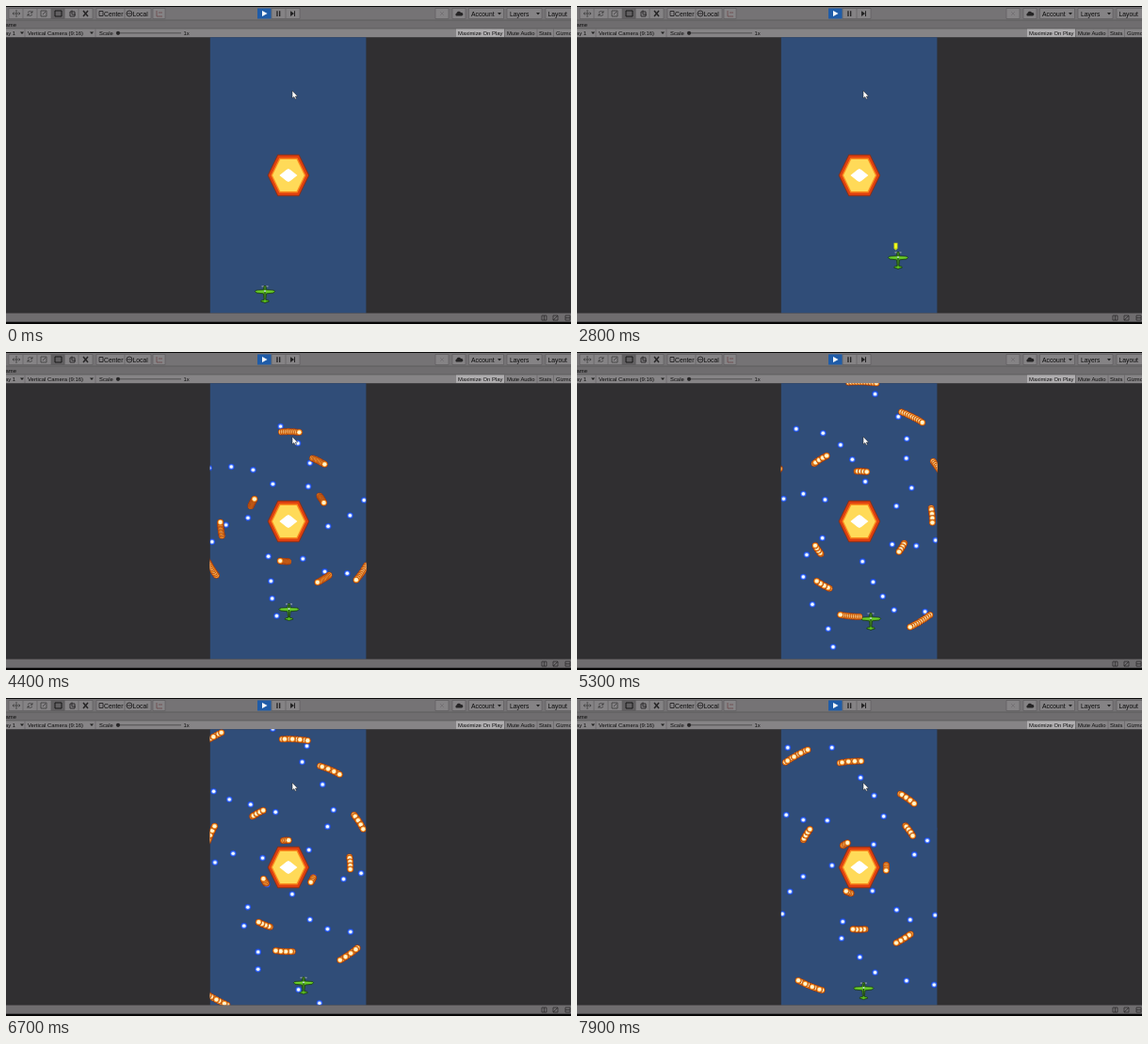
These frames come from a looping animation (600 px wide and 338 px high, 8000 ms). An HTML page:

```html
<!DOCTYPE html>
<html lang="en">
<head>
<meta charset="utf-8">
<title>Bullet patterns</title>
<style>
html, body { margin: 0; width: 100%; height: 100%; overflow: hidden; background: #302f31; }
svg { display: block; width: 100vw; height: 100vh; }
text { font-family: "Liberation Sans", Arial, sans-serif; font-size: 5.9px; fill: #0c0c0c; }
.big { font-size: 6.8px; }
.icon { fill: none; stroke: #262526; stroke-width: .9; }
</style>
</head>
<body>
<svg viewBox="0 0 600 338" preserveAspectRatio="none">
  <defs>
    <clipPath id="view"><rect x="216.8" y="33.2" width="165.6" height="293.300"/></clipPath>
    <g id="blue">
      <circle r="3.3" fill="#1d4be0"/><circle r="2.5" fill="#5c8cff"/><circle r="1.7" fill="#f4f8ff"/>
    </g>
    <g id="orange">
      <circle r="3.5" fill="#97330f"/><circle r="3" fill="#f58d1c"/><circle r="2.1" fill="#fff4d0"/>
    </g>
    <g id="shot">
      <path d="M-2-4H2V2L0 4L-2 2Z" fill="#c3d414"/><path d="M-1.2-3.2H1.2V1.5H-1.2Z" fill="#f7ff1c"/>
    </g>
    <path id="drop" d="M-2-1H2L0 1.4Z" fill="#202020"/>
    <path id="hex" d="M-22.300 0L-11.500-22.300H11.500L22.300 0L11.500 22.300H-11.500Z"/>
  </defs>

  <rect width="600" height="338" fill="#302f31"/>
  <rect width="600" height="15" fill="#757375"/>
  <rect y="15" width="600" height="9" fill="#6f6d6f"/>
  <rect y="24" width="600" height="9.200" fill="#868486"/>
  <path d="M0 15H600M0 24H600" stroke="#4f4d4f" stroke-width=".6"/>
  <rect width="600" height="1" fill="#0a0a0a"/>

  <g fill="#858385" stroke="#5c5a5c" stroke-width=".6">
    <path d="M3 2.5H92V13.5H3ZM96 2.5H154V13.5H96ZM156 2.5H169V13.5H156ZM282 2.5H312V13.5H282ZM456 2.5H470V13.5H456ZM474 2.5H488V13.5H474ZM491.5 2.5H528.5V13.5H491.5ZM532 2.5H569V13.5H532ZM573 2.5H601V13.5H573Z"/>
    <path d="M18 3V13M33 3V13M62 3V13M77 3V13M126 3V13M297 3V13"/>
    <rect x="48" y="2.5" width="14" height="11" fill="#626062"/>
  </g>
  <g class="icon">
    <path d="M7 8H15M11 4V12M8.5 6.5L7 8L8.5 9.5M13.5 6.5L15 8L13.5 9.5" stroke="#454345"/>
    <path d="M23 7A3 3 0 0 1 28 7M28 9A3 3 0 0 1 23 9M28 5V7.300H26M23 11V8.700H25" stroke="#454345"/>
    <path d="M37 5H43V11H37ZM39 9L42 6" stroke="#454345"/>
    <path d="M52 5H59V11H52Z" stroke="#111"/>
    <path d="M68 6H73V11H68ZM70 4.5V9H74"/>
    <path d="M82 5L87 11M87 5L82 11" stroke-width="1.5"/>
    <path d="M99 5.5H103V10.5H99ZM131 5A3 3 0 1 0 131 11A3 3 0 1 0 131 5M128 8H134"/>
    <path d="M160 5V11H166M162 7H166" stroke="#6f4c4e"/>
    <path d="M461 6L465 10M465 6L461 10" stroke="#747274"/>
  </g>
  <path d="M478 10.5A2 2 0 0 1 478.500 7.500A2.500 2.500 0 0 1 483 7A1.800 1.800 0 0 1 484 10.500Z" fill="#252425"/>
  <rect x="267" y="2.500" width="14.500" height="11" fill="#1f5ca8"/>
  <path d="M272 5V11L277.500 8Z" fill="#fff"/>
  <path d="M287.300 5.300H288.600V11H287.300ZM290 5.300H291.300V11H290ZM302 5.300L306 8L302 11ZM306 5.300H307V11H306Z" fill="#242324"/>
  <text class="big" x="104" y="10.500">Center</text>
  <text class="big" x="134.500" y="10.500">Local</text>
  <text class="big" x="494" y="10.500">Account</text>
  <text class="big" x="535" y="10.500">Layers</text>
  <text class="big" x="575.500" y="10.500">Layout</text>
  <text x="-.5" y="22">ame</text>
  <text x="-1" y="31">ay 1</text>
  <text x="23" y="31">Vertical Camera (9:16)</text>
  <text x="99" y="31">Scale</text>
  <text x="188.500" y="31">1x</text>
  <rect x="478" y="24.500" width="51" height="8.300" fill="#b0aeb0"/>
  <text x="480" y="31">Maximize On Play</text>
  <text x="532" y="31">Mute Audio</text>
  <text x="566" y="31">Stats</text>
  <text x="584" y="31">Gizmos</text>
  <use href="#drop" x="17" y="28.500"/><use href="#drop" x="91" y="28.500"/>
  <use href="#drop" x="524" y="8"/><use href="#drop" x="565" y="8"/>
  <path d="M119 28.800H186" stroke="#454345" stroke-width=".8"/>
  <circle cx="119" cy="28.800" r="2.100" fill="#262526"/>
  <path d="M20 24.500V33M95 24.500V33M529.500 24.500V33M564 24.500V33M581.500 24.500V33" stroke="#626062" stroke-width=".6"/>

  <rect x="216.800" y="33.200" width="165.600" height="293.300" fill="#304d78"/>
  <g clip-path="url(#view)">
    <g id="shots"></g>
    <g id="plane">
      <path d="M-3.500-6H3.500" stroke="#b9bdc4" stroke-width=".9"/>
      <path d="M-1-6.500H1L1.600-2.300L9.500-1.800L10.600-.6L9 1L1.600 1.800L.9 8.300L4 9L4.200 10.300L.9 11L0 12L-.9 11L-4.200 10.300L-4 9L-.9 8.300L-1.600 1.800L-9 1L-10.600-.6L-9.500-1.800L-1.600-2.300Z" fill="#58bb1f" stroke="#1a3a14" stroke-width=".8"/>
      <path d="M-8.500-.8H8.500" stroke="#7fda36" stroke-width=".9"/>
      <path d="M0-5.500V8" stroke="#24491d" stroke-width="1.200"/>
      <circle cy="-1" r="1" fill="#bfe2d5"/>
    </g>
    <g id="rings"></g>
    <g id="fans"></g>
  </g>
  <g transform="translate(299.900 180)">
    <use href="#hex" fill="#85301c"/>
    <use href="#hex" fill="#e0400f" transform="scale(.95)"/>
    <use href="#hex" fill="#fb8a1d" transform="scale(.83)"/>
    <use href="#hex" fill="#ffda58" transform="scale(.76)"/>
    <path d="M-9.500 0L-2-6L0-7L2-6L9.500 0L2 6L0 7L-2 6Z" fill="#fff"/>
  </g>
  <path d="M304 90V98L305.900 96.400L307.100 99L308.400 98.400L307.300 95.900H309.700Z" fill="#fff" stroke="#222" stroke-width=".5"/>

  <rect y="326.500" width="600" height="9.300" fill="#6f6d6f"/>
  <rect y="335.800" width="600" height="2.200" fill="#050505"/>
  <path class="icon" d="M569 329H574V334H569ZM571.500 329V334M581 329H586V334H581ZM581 334L586 329M594 329H599V334H594ZM594 331.500H599" style="stroke-width:.7"/>
</svg>
<script>
const LOOP = 8000, STEP = 100;
const CX = 299.6, CY = 180;
const SPEED = 58.6, BRAKE_END = 59, BRAKE = .0515;
const JITTER = 7;

// Each volley turns a little further clockwise; every gun adds a random error.
const ring = { layer: 'rings', kind: 'blue', volleys: 16, first: 3500, every: 300, guns: 6, turn: 10, from: 2, size: 1 };
const fan = { layer: 'fans', kind: 'orange', volleys: 12, first: 3600, every: 400, guns: 3, turn: 30, from: -6.5, size: 11 };
const FAN_STEP = 1.14, REUSE_AFTER = 3;

// Time, x, y of the player's turns.
const planePath = [
  [0, 275, 304], [900, 355, 298], [1400, 291, 298], [1850, 348, 298], [2300, 291, 282], [2800, 341, 268],
  [4400, 300.5, 274], [5300, 312, 284], [6200, 311, 297], [7200, 321, 309.5], [8000, 302, 309]
];
const shotTimes = [500, 1400, 2785];

const byId = id => document.getElementById(id);
function addSprite(layer, kind) {
  const node = document.createElementNS('http://www.w3.org/2000/svg', 'use');
  node.setAttribute('href', '#' + kind);
  return byId(layer).appendChild(node);
}
function place(node, x, y) {
  node.setAttribute('transform', `translate(${x.toFixed(2)} ${y.toFixed(2)})`);
}
function show(node, visible) {
  node.setAttribute('display', visible ? 'inline' : 'none');
}
function seeded(seed) {
  return () => (seed = (seed * 16807) % 2147483647) / 2147483647;
}

// Recycled bullets no longer stack in firing order.
function stackOrder(size, recycled) {
  const slots = Array.from({ length: size }, (_, i) => i);
  return recycled ? slots.sort((a, b) => (a % 3 === 1) - (b % 3 === 1) || a - b) : slots;
}

const bullets = [];
function addVolleys(gun, random) {
  for (let v = 0; v < gun.volleys; v++) {
    for (let g = 0; g < gun.guns; g++) {
      const aim = gun.from + gun.turn * v + 360 / gun.guns * g + (random() * 2 - 1) * JITTER;
      for (const slot of stackOrder(gun.size, v >= REUSE_AFTER)) {
        const a = (aim + slot * FAN_STEP) * Math.PI / 180;
        bullets.push({
          node: addSprite(gun.layer, gun.kind), start: gun.first + gun.every * v,
          dx: Math.sin(a), dy: -Math.cos(a)
        });
      }
    }
  }
}
const random = seeded(4127);
addVolleys(ring, random);
addVolleys(fan, random);
const shots = shotTimes.map(time => ({ time, node: addSprite('shots', 'shot') }));

// Bullets leave fast and brake to a steady speed.
function radius(age) {
  const r = 48.5 + SPEED * age / 1000;
  return r - BRAKE * Math.max(0, BRAKE_END - r) ** 2;
}

function planeAt(t) {
  const n = planePath.findIndex(p => p[0] > t);
  const [t0, x0, y0] = planePath[n - 1], [t1, x1, y1] = planePath[n];
  const u = (t - t0) / (t1 - t0);
  return [x0 + (x1 - x0) * u, y0 + (y1 - y0) * u];
}

function render(t) {
  place(byId('plane'), ...planeAt(t));
  for (const { node, start, dx, dy } of bullets) {
    const r = radius(t - start);
    show(node, r > 0 && r < 190);
    place(node, CX + dx * r, CY + dy * r);
  }
  for (const { time, node } of shots) {
    const [x, y] = planeAt(time);
    show(node, t >= time);
    place(node, x - 1, y - 9 - (t - time) * .24);
  }
}

const begin = performance.now();
let shownTime = -1;
function tick(now) {
  const t = Math.floor(Math.max(0, now - begin) % LOOP / STEP) * STEP;
  if (t !== shownTime) render(shownTime = t);
  requestAnimationFrame(tick);
}
render(0);
requestAnimationFrame(tick);
</script>
</body>
</html>
```
